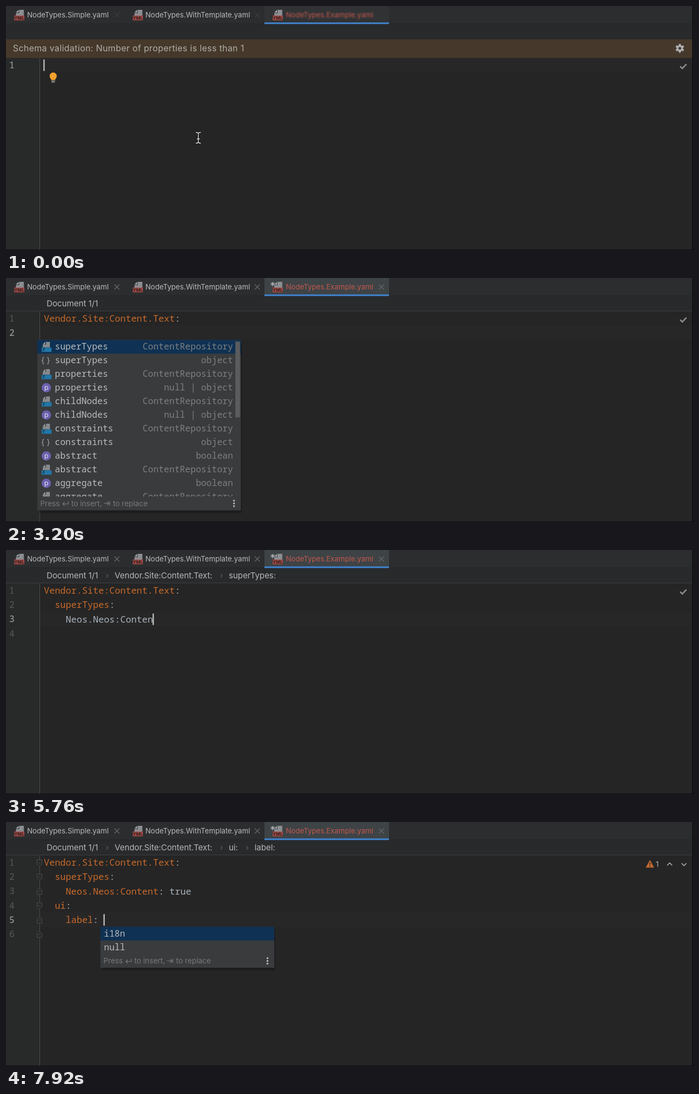
Animation, 1252 px wide and 447 px high, one loop 8000 ms. Source, as an HTML page:

```html
<!DOCTYPE html>
<html lang="en">
<head>
<meta charset="utf-8">
<title>YAML completion</title>
<style>
html, body { margin: 0; width: 100%; height: 100%; overflow: hidden; background: #252525; }
svg { display: block; width: 100vw; height: 100vh; }
text { white-space: pre; }
.ui { font-family: Inter, "Open Sans", sans-serif; }
.mono { font-family: "Noto Sans Mono", "DejaVu Sans Mono", monospace; }
</style>
</head>
<body>
<svg id="stage" viewBox="0 0 1252 447" preserveAspectRatio="none"></svg>
<script>
const LOOP = 8000, STEP = 80;
const CHAR = 9.95, LEFT = 69, TOP = 61, LINE = 26.2;
const KEY = '#c96a2b', PLAIN = '#a9b3bd', BLUE = '#4b93e8';

// Drawing helpers
const esc = s => s.replace(/&/g, '&amp;').replace(/</g, '&lt;');
const rect = (x, y, w, h, fill, extra = '') =>
  `<rect x="${x}" y="${y}" width="${w}" height="${h}" fill="${fill}" ${extra}/>`;
const path = (d, stroke, width = 1, fill = 'none') =>
  `<path d="${d}" stroke="${stroke}" stroke-width="${width}" fill="${fill}"/>`;
const text = (cls, size, x, y, s, fill, extra = '') =>
  `<text class="${cls}" font-size="${size}" x="${x}" y="${y}" fill="${fill}" ${extra}>${s}</text>`;
const ui = (x, y, s, fill, size = 13.45, extra) => text('ui', size, x, y, esc(s), fill, extra);
const mono = (x, y, s, fill, size = 16.58, extra) => text('mono', size, x, y, esc(s), fill, extra);
const at = (x, y, body) => `<g transform="translate(${x} ${y})">${body}</g>`;
const span = (s, fill) => `<tspan fill="${fill}">${esc(s)}</tspan>`;

// Completion lists: kind, name, type
const rows = s => s.split('|').map(r => r.split(','));
const CR = 'ContentRepository', OBJ = 'object', NULLABLE = 'null / object';
const fieldPopup = {
  x: 57, w: 371, h: 287, selected: '#0f3153', scroll: true,
  rows: rows(`F,superTypes,${CR}|o,superTypes,${OBJ}|F,properties,${CR}|p,properties,${NULLABLE}|` +
    `F,childNodes,${CR}|p,childNodes,${NULLABLE}|F,constraints,${CR}|o,constraints,${OBJ}|` +
    `p,abstract,boolean|F,abstract,${CR}|p,aggregate,boolean|F,aggregate,${CR}`)
};
const uiPopup = {
  x: 57, w: 625, h: 75, selected: '#434648', match: 'u', tip: true,
  rows: rows(`F,ui,${CR}|o,ui,${OBJ}|F,superTypes,${CR}`)
};
const labelPopup = { x: 172, w: 317, h: 50, selected: '#0f3153', rows: rows(',i18n,|,null,') };

// Timeline: each cue overrides part of the state
const cues = [];
const cue = (time, change) => cues.push([time, change]);
function type(start, step, done, prefix, added, extra = {}) {
  [...added].forEach((_, i) => {
    const line = prefix + added.slice(0, i + 1);
    cue(start + i * step, { lines: [...done, line], row: done.length, col: line.length, ...extra });
  });
}

const DOC = 'Document 1/1', ROOT = 'Vendor.Site:Content.', NODE = ROOT + 'Text:';
const SUPER = '  superTypes:', TRUE = '    Neos.Neos:Content: true';

cue(0, { lines: [''], row: 0, col: 0, count: 1, shift: 34, banner: true, mouse: true, bulb: true,
  status: 'ok', crumbs: [], folds: '', hl: null, mark: 0, popup: null, fresh: true });
cue(80, { fresh: false });
type(320, 55, [], '', ROOT, { shift: 0, banner: false, mouse: false, bulb: false, crumbs: [DOC, ROOT] });
cue(880, { status: 'warn', mark: 95, hl: [0, 0] });
cue(1520, { bulb: true });
type(1840, 80, [], ROOT, 'Text', { bulb: false, crumbs: [DOC, ROOT + 'Text'] });
type(2320, 80, [], ROOT + 'Text', ':', { status: 'ok', hl: null, crumbs: [DOC, NODE] });
cue(2720, { lines: [NODE, ''], row: 1, col: 2, count: 2, mark: 0, crumbs: [DOC] });
cue(2960, { popup: fieldPopup });
cue(3680, { popup: null });
cue(3760, { lines: [NODE, ''], count: 3 });
cue(4480, { popup: fieldPopup });
cue(4720, { popup: null, lines: [NODE, SUPER], row: 2, col: 4, count: 4, hl: [1, 2], mark: 121.2,
  crumbs: [DOC, NODE, 'superTypes:'] });
type(5200, 36, [NODE, SUPER], '    ', TRUE.trim(), { hl: null, mark: 0 });
cue(6120, { lines: [NODE, SUPER, TRUE], row: 3, col: 2, count: 5, folds: 'vv^', crumbs: [DOC, NODE] });
type(6400, 80, [NODE, SUPER, TRUE], '  ', 'u', { crumbs: [DOC, NODE, 'u'] });
cue(6480, { popup: uiPopup });
cue(6720, { popup: null, lines: [NODE, SUPER, TRUE, '  ui:'], row: 4, col: 4, count: 6,
  folds: 'vv^v^^', crumbs: [DOC, NODE, 'ui:'] });
type(7200, 70, [NODE, SUPER, TRUE, '  ui:'], '    ', 'label: ', { crumbs: [DOC, NODE, 'ui:', 'label:'] });
cue(7760, { popup: labelPopup, status: 'warn' });

function stateAt(t) {
  const s = {};
  for (const [time, change] of cues) {
    if (time > t) break;
    Object.assign(s, change);
    if (change.lines) s.edited = time;
  }
  return s;
}

// Icons
const page = path('M9 0H17.500V11H3V6H9Z', 'none', 0, '#8b8f92') + path('M3 5L8 0V5Z', 'none', 0, '#a5a8aa');
const ymlIcon = x => at(x, 7, page + rect(0, 10.5, 18.5, 8.8, '#a34a45') +
  ui(9.2, 18, 'YML', '#32211f', 8.2, 'text-anchor="middle" font-weight="700"'));
const kindIcon = {
  F: at(65, -9, path('M8 0H15V10H2V5H8Z', 'none', 0, '#85898c') + path('M2 4.5L6.5 0V4.5Z', 'none', 0, '#a5a8aa') +
    rect(0, 10.5, 18, 8, '#2277a8') + ui(2, 17.5, 'F', '#12364d', 7.5, 'font-weight="700"')),
  o: ui(64, 5, '{ }', '#a2a5a8', 14.5),
  p: `<circle cx="73.5" cy="0" r="8.5" fill="#6b61ad"/>` + ui(73.5, 4, 'p', '#e2e0f0', 12.5, 'text-anchor="middle"'),
  '': ''
};
const bulb = y => at(86, y, path('M-3.5 5.5C-3.5 3-6.5 2-6.5 -2A6.5 6.5 0 0 1 6.5 -2C6.5 2 3.5 3 3.5 5.5Z', 'none', 0, '#f0a030') +
  path('M-3.5 7H3.5M-3 9.2H3', '#a0a0a0', 1.3));
const check = y => path(`M1228.5 ${y}l4 4l7.500 -8`, '#878a8c', 2.6);
const close = x => path(`M${x - 4.5} 12l9 9m0 -9l-9 9`, '#66696c', 1.2);
const gear = () => {
  const teeth = [0, 60, 120].map(a => rect(-2, -8, 4, 16, '#aeb0b2', `rx="1" transform="rotate(${a})"`)).join('');
  return at(1228, 77.5, teeth + '<circle r="5.8" fill="#aeb0b2"/><circle r="2.5" fill="#46392b"/>');
};
const ibeam = () => {
  const d = 'M346 231.500Q350 231.500 350.500 234Q351 231.500 355 231.500M350.500 234V249M346 251.500Q350 251.500 350.500 249Q351 251.500 355 251.500M348 243.500H353';
  return path(d, '#0c0c0c', 3.5) + path(d, '#e6e6e6', 1.4);
};
const warning = () =>
  path('M1173.500 71.500L1179.500 82.500H1167.500Z', '#c26a31', 1.8, '#c26a31') +
  path('M1173.500 74.500V78.500M1173.500 80V81.700', '#2a2521', 1.7) +
  ui(1184, 82, '1', '#b2b4b6', 13.5) +
  path('M1205 79.500l4.500 -4.500l4.500 4.500M1231 75.500l4.500 4.500l4.500 -4.500', '#a9acae', 1.6);

// Window parts
function tabs(s) {
  const names = [[15, 38.5, 202, 'Simple'], [231, 254, 458, 'WithTemplate'], [486, 510, 684, 'Example']];
  let out = rect(0, 0, 1252, 32, '#2b2d2f') + rect(471, 0, 227, 31, s.fresh ? '#303234' : '#3e4346') +
    rect(216, 0, 1, 32, '#292a2c') + rect(471, 30, 227, 3.4, '#3f7fc6');
  names.forEach(([icon, x, cross, name], i) => {
    const label = `NodeTypes.${name}.yaml`, active = i === 2;
    out += ymlIcon(icon) + ui(x, 21.3, label, active ? '#c2594e' : '#b9bbbd', 13.1,
      active && s.fresh ? 'style="filter:blur(.8px)"' : '');
    if (!s.fresh) out += close(cross);
    else if (!active) out += `<g opacity=".25">${close(cross)}</g>`;
  });
  if (!s.banner) out += path('M486 7V15M482.500 9L489.500 13M482.500 13L489.500 9', '#c0c2c4', 1.2);
  return out;
}

function crumbs(s) {
  const xs = [74, 198, 406, 453];
  return s.crumbs.map((c, i) =>
    (i ? path(`M${xs[i] - 15} 44l3 3.500l-3 3.500`, '#65686a', 1.1) : '') + ui(xs[i], 52.3, c, '#b7b9bb', 14.85)).join('');
}

function codeLine(line, y) {
  const m = line.match(/^( *)(\S+)(:(?: .*)?)$/);
  const indent = line.length - line.trimStart().length;
  const body = m ? span(m[2], KEY) + span(m[3], PLAIN) : esc(line.trimStart());
  return text('mono', 16.58, LEFT + indent * CHAR, y, body, PLAIN);
}

function fold(dir, y) {
  const k = dir === 'v' ? 1 : -1;
  return path(`M56.500 ${y - 5.5 * k}H65.500V${y + 2 * k}L61 ${y + 6 * k}L56.500 ${y + 2 * k}Z M58.500 ${y}H63.500`, '#4a4d4f', 1, '#272829');
}

function editor(s, t) {
  const top = TOP + s.shift, mid = i => top + 13.3 + i * LINE;
  let out = rect(0, top, 61, 447 - top, '#282929') +
    rect(62, top + s.row * LINE, 1188, LINE, '#272727') + rect(61, top, 1, 447 - top, '#47494b');
  if (s.hl) {
    const [row, col] = s.hl, len = s.lines[row].replace(/:$/, '').length - col;
    out += rect(LEFT + col * CHAR, top + 1 + row * LINE, len * CHAR, 25, row ? '#4b3d22' : '#483c2a');
  }
  for (let i = 0; i < s.count; i++)
    out += mono(6, mid(i) + 5.6, String(i + 1), i === s.row ? '#a6a8aa' : '#56595b', 15.8);
  [...s.folds].forEach((f, i) => out += fold(f, mid(i) + 0.5));
  s.lines.forEach((line, i) => out += codeLine(line, mid(i) + 5.8));
  if ((t - s.edited) % 960 < 480)
    out += rect(LEFT + s.col * CHAR - 0.8, mid(s.row) - 10.3, 2.2, 21, '#c4c6c8');
  if (s.bulb) out += bulb(mid(0) + 22);
  out += s.status === 'ok' ? check(76.5 + s.shift) : warning();
  if (s.mark) out += rect(1233, s.mark - 1.3, 17, 2.6, '#b0642c');
  return out;
}

function hint(p, y) {
  const dim = '#777a7c', x = p.x + 5.5, base = y + 4.7;
  let out = ui(x, base, 'Press', dim);
  if (p.tip) {
    out += path(`M${x + 40} ${y}l5 -5l5 5`, dim, 1.3) + ui(x + 50.5, base, '.', dim) +
      ui(x + 56.5, base, 'to choose the selected (or first) suggestion and insert a dot afterwards', dim) +
      ui(x + 511, base, 'Next Tip', BLUE);
  } else {
    out += path(`M${x + 51} ${y - 4}v5h-10m3.500 -3.500l-3.500 3.500l3.500 3.500`, dim, 1.2) +
      ui(x + 56.5, base, 'to insert,', dim) +
      path(`M${x + 116} ${y}h9m-3.500 -3.500l3.500 3.500l-3.500 3.500m5 -7.500v8`, dim, 1.2) +
      ui(x + 132.5, base, 'to replace', dim);
  }
  for (const d of [-5, 0, 5]) out += `<circle cx="${p.x + p.w - 12.5}" cy="${y + d}" r="1.7" fill="#b8babc"/>`;
  return out;
}

function popup(p, row) {
  const y = TOP + (row + 1) * LINE, bottom = y + p.h, textX = p.x + (p.rows[0][0] ? 32 : 6.5);
  let out = rect(p.x + 4, y + 6, p.w - 2, p.h + 24, '#191919', 'opacity=".65"') +
    rect(p.x, y, p.w, p.h + 25, '#393b3d') + rect(p.x, y, p.w, 25, p.selected);
  p.rows.forEach(([kind, name, kindName], i) => {
    const mid = y + 12.5 + i * 25, hit = p.match ? name.indexOf(p.match) : -1;
    const body = hit < 0 ? esc(name)
      : esc(name.slice(0, hit)) + span(name[hit], BLUE) + esc(name.slice(hit + 1));
    out += at(0, mid, kindIcon[kind]) + text('mono', 16.15, textX, mid + 5.3, body, '#b9bbbd') +
      mono(p.x + p.w - 14.3, mid + 5.3, kindName.replace('/', '|'), '#7d8082', 16.15, 'text-anchor="end"');
  });
  if (p.scroll) out += rect(p.x + 361, y + 3, 8.5, 139, '#5a5c5e');
  return out + rect(p.x, bottom, p.w, 25, '#393b3d') + hint(p, bottom + 12.5);
}

function draw(t) {
  const s = stateAt(t);
  return rect(0, 0, 1252, 447, '#252525') + tabs(s) + rect(0, 33.4, 1252, 27.6, '#282a2b') +
    (s.banner
      ? rect(0, 61, 1252, 34, '#46392b') +
        ui(12.5, 83.4, 'Schema validation: Number of properties is less than 1', '#b0aea8', 15.72, 'letter-spacing=".35"') + gear()
      : rect(0, 60, 1252, 1, '#3c3e40')) +
    crumbs(s) + editor(s, t) + (s.popup ? popup(s.popup, s.row) : '') + (s.mouse ? ibeam() : '') +
    rect(1250.5, 0, 1.5, 447, '#0e0e0e') + rect(0, 446, 1252, 1, '#0e0e0e');
}

const stage = document.getElementById('stage');
const origin = performance.now();
let shown = -1;
function tick() {
  const t = Math.floor(((performance.now() - origin) % LOOP) / STEP) * STEP;
  if (t !== shown) stage.innerHTML = draw(shown = t);
  requestAnimationFrame(tick);
}
tick();
</script>
</body>
</html>
```
